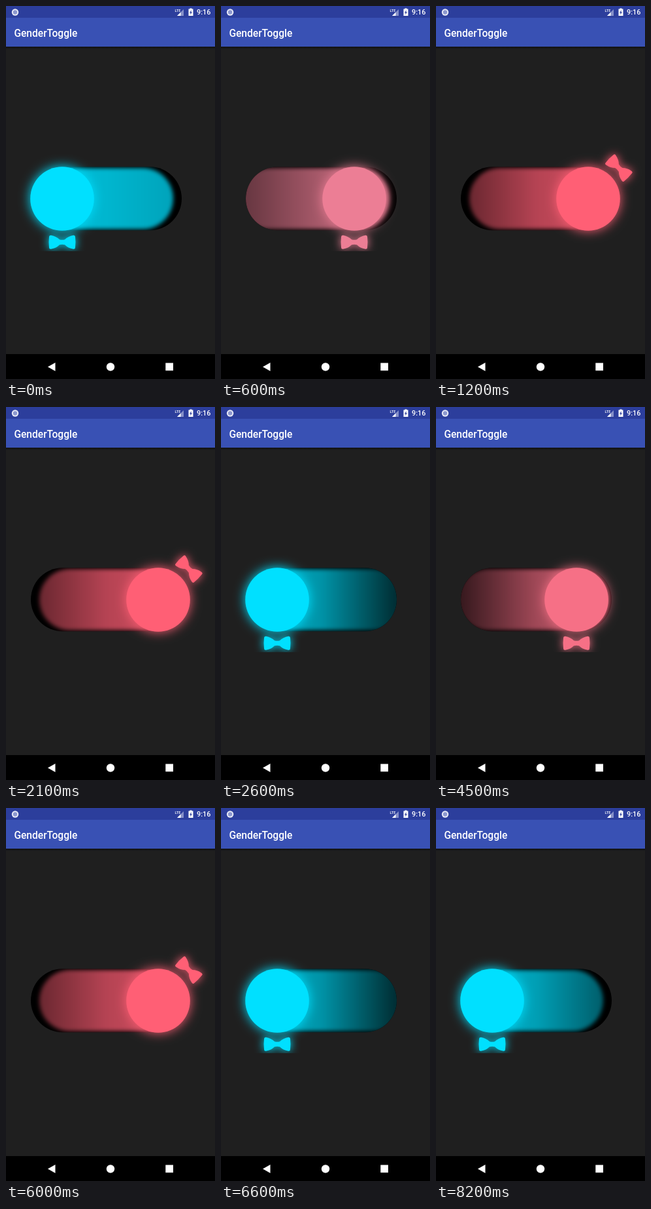
Animation, 320 px wide and 569 px high, one loop 8.9 s. Source, as an HTML page with a canvas:

```html
<!DOCTYPE html>
<html lang="en">
<head>
<meta charset="utf-8">
<title>GenderToggle</title>
<style>
html, body { margin: 0; width: 100%; height: 100%; overflow: hidden; background: #1f1f1f; }
canvas { display: block; width: 320px; height: 569px; }
</style>
</head>
<body>
<canvas id="stage" width="320" height="569"></canvas>
<script>
const g = document.getElementById('stage').getContext('2d');
const LOOP = 8900, STEP = 100;
const STARTS = [186, 2130, 4026, 6130]; // even: to the right, odd: back
const CYAN = [0, 224, 255], PINK = [255, 95, 117];
const BOW = new Path2D('M-17-10.5Q-9-9-4-4Q0-3 4-4Q9-9 17-10.5Q20-11 20-8Q21 0 20 8' +
  'Q20 11 17 10.5Q9 9 4 4Q0 3-4 4Q-9 9-17 10.5Q-20 11-20 8Q-21 0-20-8Q-20-11-17-10.5Z');

const lin = u => Math.min(1, Math.max(0, u));
const ease = u => (u = lin(u)) < .5 ? 4 * u ** 3 : 1 - 4 * (1 - u) ** 3;
const mix = (a, b, u) => a + (b - a) * u;
const rgb = (c, k = 1) => `rgb(${c.map(v => Math.round(v * k))})`;
const blend = u => CYAN.map((v, i) => mix(v ** 2.2, PINK[i] ** 2.2, u) ** (1 / 2.2));

function pose(t) {
  const i = STARTS.filter(s => s <= t).length - 1;
  if (i < 0) return { x: 86, hue: 0, turn: 0, shift: -13, left: .85, right: .72 };
  const e = t - STARTS[i];
  const far = i ? .2 + .18 * (1 - (1 - lin((e - 500) / 1400)) ** 3) : .38;
  if (i % 2) {
    const k = ease(e / 450);
    return { x: 233 - 147 * k, hue: 1 - k, turn: 1 - k, shift: 13 - 26 * lin((e - 430) / 400),
      left: mix(.38, .85, k), right: mix(.85, far, k) };
  }
  const k = ease(e / 600), push = ease((e - 600) / 250);
  return { x: 86 + 134 * k + 13 * push, hue: .96 * k + .04 * push, turn: ease((e - 480) / 360),
    shift: -13 + 26 * lin((e - 400) / 250),
    left: mix(.85, far, k), right: mix(i ? .38 : .72, .85, k) };
}

function box(color, x, y, w, h) {
  g.fillStyle = color;
  g.fillRect(x, y, w, h);
}

function shape(color, draw) {
  g.fillStyle = color;
  g.beginPath();
  draw();
  g.fill();
}

const disc = (color, x, y, r) => shape(color, () => g.arc(x, y, r, 0, 7));
const poly = (color, ...p) => shape(color, () => {
  for (let i = 0; i < p.length; i += 2) g.lineTo(p[i], p[i + 1]);
});

function text(s, x, y, size) {
  g.font = `500 ${size}px Roboto, sans-serif`;
  g.fillStyle = '#fff';
  g.fillText(s, x, y);
}

function chrome() {
  box('#1f1f1f', 0, 0, 320, 569);
  const shade = g.createLinearGradient(0, 62, 0, 66);
  shade.addColorStop(0, '#111');
  shade.addColorStop(1, '#1f1f1f');
  box(shade, 0, 62, 320, 4);
  box('#2c3e9c', 0, 0, 320, 18);
  box('#3951b4', 0, 18, 320, 44);
  text('GenderToggle', 12.4, 46.5, 15.57);
  disc('#e8eaf6', 14, 9.5, 5.2);
  disc('#8c98cf', 14, 9.5, 3.2);
  text('LTE', 258.5, 8.7, 5.5);
  poly('#8590c8', 272, 5, 272, 15, 262, 15);
  poly('#fff', 267.5, 9.5, 267.5, 15, 262, 15);
  box('#fff', 281.5, 3.5, 3, 2);
  box('#fff', 279.5, 4.5, 7, 10.5);
  poly('#2c3e9c', 283.8, 6, 281, 10.4, 282.7, 10.4, 282.2, 13.6, 285, 9.2, 283.3, 9.2);
  text('9:16', 292, 13.3, 10.9);
  box('#000', 0, 531, 320, 38);
  poly('#fff', 64, 550.5, 75.5, 544, 75.5, 557);
  disc('#fff', 160, 550.5, 6.2);
  box('#fff', 244.3, 544.5, 11.7, 11.7);
}

function track(p, color) {
  const mid = (p.left + p.right) / 2 + .2 * Math.abs(p.left - p.right);
  const light = g.createLinearGradient(38, 0, 269, 0);
  [p.left, mid, p.right].forEach((k, i) => light.addColorStop(i / 2, rgb(color, k)));
  g.save();
  g.beginPath();
  g.roundRect(38, 245.3, 231, 97, 48.5);
  g.clip();
  box('#000', 38, 245, 231, 98);
  g.filter = 'blur(3px)';
  shape(light, () => g.roundRect(38 + p.shift, 247, 231, 93.5, 46.7));
  g.restore();
}

function toggle(p) {
  const color = blend(p.hue);
  g.save();
  g.beginPath();
  g.rect(0, 62, 320, 312);
  g.clip();
  track(p, color);
  g.shadowColor = rgb(color);
  g.shadowBlur = 17;
  disc(rgb(color), p.x, 294, 48.8);
  g.translate(p.x, 294);
  g.rotate(-p.turn * Math.PI * .75);
  g.translate(0, 66.3);
  g.shadowBlur = 14;
  g.fill(BOW);
  g.restore();
}

function frame(now) {
  const t = Math.floor(now % LOOP / STEP) * STEP;
  chrome();
  toggle(pose(t));
  requestAnimationFrame(() => frame(performance.now()));
}
frame(0);
</script>
</body>
</html>
```
